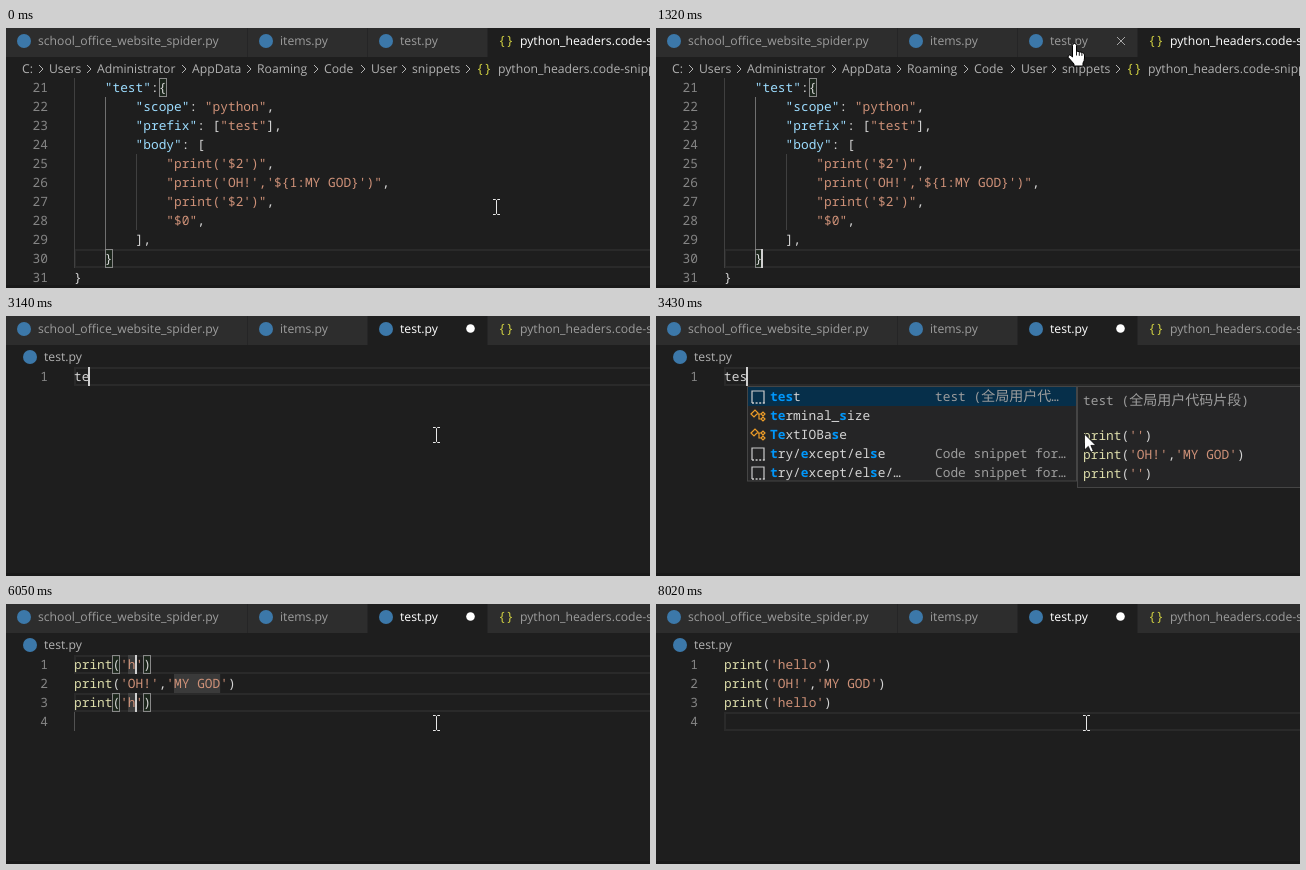
An HTML page that plays this animation: 644x260 px, repeating every 8.56 s.

```html
<!DOCTYPE html>
<html lang="en">
<head>
<meta charset="utf-8">
<title>Snippet demo</title>
<style>
  html, body { margin: 0; width: 100%; height: 100%; overflow: hidden; background: #1e1e1e; }
  svg { display: block; width: 644px; height: 260px; text-rendering: geometricPrecision; }
  text { white-space: pre; font-variant-ligatures: none; }
  .code { font: 500 12.83px "Noto Sans Mono", "Noto Sans CJK SC", monospace; }
  .ui { font: 12.2px "Open Sans", sans-serif; }
  .cjk { font: 14px "Noto Sans CJK SC", "Noto Sans CJK", sans-serif; }
</style>
</head>
<body>
<svg id="stage" viewBox="0 0 644 260"></svg>
<script>
const LOOP = 8560, LEFT = 68, TOP = 51, CW = 7.697, LH = 19;
const PLAIN = '#d4d4d4', KEY = '#9cdcfe', STR = '#ce9178', FUNC = '#dcdcaa';
const GREY = '#9d9d9d', CRUMB = '#b2b2b2', BLUE = '#3c78a9', YELLOW = '#cbcb41';
const stage = document.getElementById('stage');

const SNIPPET = [
  '    "test":{',
  '        "scope": "python",',
  '        "prefix": ["test"],',
  '        "body": [',
  '            "print(\'$2\')",',
  '            "print(\'OH!\',\'${1:MY GOD}\')",',
  '            "print(\'$2\')",',
  '            "$0",',
  '        ],',
  '    }',
  '}'
];

// Mouse path: time, x, y
const PATH = [
  [0, 490, 179], [80, 489, 176], [450, 478, 132], [890, 462, 82], [960, 441, 61],
  [1020, 421, 44], [1110, 421, 44], [1180, 421, 36], [1320, 420, 15], [1480, 420, 15],
  [1550, 420, 12], [1640, 420, 12], [1710, 420, 11], [1930, 420, 11], [2000, 428, 22],
  [2100, 440, 58], [2200, 436, 98], [2300, 430, 119], [LOOP, 430, 119]
];

const CARET_OFF = [
  [0, 80], [520, 1020], [1550, 2300], [2840, 2980], [3910, 4190],
  [4730, 5190], [7340, 7560], [8020, LOOP]
];

const within = (t, a, b) => t >= a && t < b;
const colX = c => Math.round(LEFT + c * CW);
const rowY = r => TOP + r * LH;
const rect = (x, y, w, h, fill, more = '') =>
  `<rect x="${x}" y="${y}" width="${w}" height="${h}" fill="${fill}" ${more}/>`;
const line = (d, color, width = 1) =>
  `<path d="${d}" fill="none" stroke="${color}" stroke-width="${width}"/>`;
const text = (x, y, s, fill, cls = 'ui') =>
  `<text class="${cls}" x="${x}" y="${y}" fill="${fill}">${s}</text>`;
const dot = (x, y, r, fill) => `<circle cx="${x}" cy="${y}" r="${r}" fill="${fill}"/>`;
const move = (x, y, body) => `<g transform="translate(${x} ${y})">${body}</g>`;

// Syntax-coloured line of code
function code(x, y, s) {
  const rule = /("[^"]*"(?=:))|("[^"]*"|'[^']*')|(print)|(?:(?!print)[^"'])+|./g;
  let out = '';
  for (const m of s.matchAll(rule)) {
    const fill = m[1] ? KEY : m[2] ? STR : m[3] ? FUNC : PLAIN;
    out += `<tspan x="${x + m.index * CW}" fill="${fill}">${m[0]}</tspan>`;
  }
  return text(x, y, out, PLAIN, 'code');
}

const lines = (list, first) => list.map((s, i) => {
  const n = String(first + i);
  return text(42 - n.length * CW, rowY(i) + 14, n, '#858585', 'code') + code(LEFT, rowY(i) + 14, s);
}).join('');

const bracket = (col, row) =>
  rect(colX(col) + .5, rowY(row) + .5, 7, 18, 'rgba(0,100,0,.1)', 'stroke="#888"');
const currentLine = row =>
  rect(LEFT + 1, rowY(row) + 1, 600, 17, 'none', 'stroke="#2a2a2a" stroke-width="2"');
const guide = (col, r1, r2, color) => rect(colX(col), rowY(r1), 1, (r2 - r1) * LH, color);
const mark = (col, row, n, color) => rect(colX(col), rowY(row), n * CW, LH, color);

function caret(t, col, row) {
  if (CARET_OFF.some(([a, b]) => within(t, a, b))) return '';
  return rect(col ? colX(col) - 1 : LEFT, rowY(row), 2, LH, '#d0d0d0');
}

function squiggle(x, y, w) {
  let d = `M${x} ${y + 2}`;
  for (let i = 0; i < w / 3; i++) d += `l3 ${i % 2 ? 2 : -2}`;
  return line(d, '#cca700');
}

const braces = (x, y) => text(x, y, '{}', YELLOW, 'code');

function tabs(t) {
  const active = t < 1850 ? 3 : 2;
  const names = ['school_office_website_spider.py', 'items.py', 'test.py', 'python_headers.code-snippets'];
  const edges = [0, 242, 362, 482, 720];
  let out = rect(0, 0, 644, 29, '#252526');
  names.forEach((name, i) => {
    const x = edges[i], on = i === active;
    out += rect(x, 0, edges[i + 1] - x - 1, 29, on ? '#1e1e1e' : '#2d2d2d');
    out += i < 3 ? dot(x + 18, 13, 7, BLUE) : braces(x + 10.3, 17);
    out += text(x + 32, 17, name, on ? '#fff' : '#9c9c9c');
  });
  if (t >= 2980) out += dot(464.5, 12.5, 4.3, '#fff');
  else if (t >= 1250) out += line('M461 9l8 8m0-8l-8 8', '#a8a8a8');
  return out;
}

function crumbs(t) {
  if (t >= 1850) return dot(24, 41, 7, BLUE) + text(38, 45, 'test.py', CRUMB);
  const parts = [[16, 'C:'], [43, 'Users'], [91, 'Administrator'], [186, 'AppData'],
    [251, 'Roaming'], [318, 'Code'], [365, 'User'], [406, 'snippets'], [492, 'python_headers.code-snippets']];
  return parts.map(([x, s], i) => {
    const lit = s === 'snippets' && within(t, 1020, 1180);
    const chevX = i === 8 ? 460 : x - 10;
    return (i ? line(`M${chevX} 37l4 4-4 4`, CRUMB) : '') + text(x, 45, s, lit ? '#e0e0e0' : CRUMB);
  }).join('') + braces(470.3, 45);
}

// This file is scrolled by one pixel
function snippetFile(t) {
  return move(0, -1, currentLine(9) + guide(0, 0, 10, '#404040') + guide(4, 1, 9, '#707070') +
    guide(8, 4, 8, '#404040') + bracket(11, 0) + bracket(4, 9) +
    lines(SNIPPET, 21) + caret(t, 5, 9));
}

// Colours the typed letters in order of appearance
function matched(label, typed) {
  let k = 0;
  return [...label].map(ch => ch.toLowerCase() === typed[k]
    ? (k++, `<tspan fill="#0097fb" font-weight="600">${ch}</tspan>`) : ch).join('');
}

const snippetIcon = (x, y) =>
  line(`M${x} ${y + 6}v-12h12v12`, '#ccc', 1.2) +
  `<path d="M${x} ${y + 6}h13" stroke="#ccc" stroke-width="1.4" stroke-dasharray="2 1.6"/>`;
const classIcon = (x, y) =>
  line(`M${x} ${y - 2}l4-4 3 3-4 4zm6 0h4m-2 0v5h2m0-5l2-2 2 2-2 2zm0 5l2-2 2 2-2 2z`, '#ee9d28', 1.2);
const cjk = (head, body, tail) => `${head}<tspan class="cjk">${body}</tspan>${tail}`;

function popup(x, typed) {
  const short = cjk('test (', '全局用户代', '…');
  const items = [['test', short], ['terminal_size'], ['TextIOBase'], ['TextIOWrapper'],
    ['try/except/else', 'Code snippet for…'], ['try/except/else/…', 'Code snippet for…']]
    .filter(([s]) => typed === 'te' || s !== 'TextIOWrapper');
  const px = x + 330;
  let out = rect(x + .5, 70.5, 329, items.length * LH - .5, '#252526', 'stroke="#454545"') +
    rect(x + 1, 71, 328, LH, '#062f4a');
  items.forEach(([label, info], i) => {
    const y = 80 + i * LH;
    out += info ? snippetIcon(x + 5, y + 1) : classIcon(x + 4, y + 1);
    out += text(x + 23, y + 5, matched(label, typed), PLAIN, 'code');
    if (info) out += text(x + 188, y + 5, info, GREY, 'code');
  });
  out += rect(px + .5, 70.5, 330, 101, '#252526', 'stroke="#454545"');
  out += text(px + 6, 89, cjk('test (', '全局用户代码片段', ')'), GREY, 'code');
  ["print('')", "print('OH!','MY GOD')", "print('')"].forEach((s, i) => {
    out += code(px + 6, 124 + i * LH, s);
  });
  return out;
}

function typing(t) {
  const s = t < 2980 ? '' : t < 3140 ? 't' : t < 3430 ? 'te' : 'tes';
  return currentLine(0) + lines([s], 1) + (t >= 4050 ? squiggle(LEFT, 67, 23) : '') +
    caret(t, s.length, 0) + (t >= 3200 ? popup(t < 3430 ? 83 : 91, s) : '');
}

function filled(t) {
  const n = [6050, 6110, 6500, 6650, 6880].filter(at => t >= at).length;
  const word = 'hello'.slice(0, n), call = `print('${word}')`;
  const done = t >= 7560, second = t >= 5590;
  const hint = 'rgba(124,124,124,.3)';
  let under = '', over = '';
  if (done) {
    under = currentLine(3);
    over = caret(t, 0, 3);
  } else {
    if (second) under += currentLine(0) + currentLine(2);
    else under += mark(13, 1, 6, '#264f78');
    if (t >= 4270) {
      under += mark(13, 1, 6, hint) + rect(LEFT, rowY(3), 1, LH, '#525252');
      for (const r of [0, 2])
        under += n ? mark(7, r, n, hint) : rect(colX(7), rowY(r), 1, LH, '#5a5a5a');
    }
    if (t < 4820) over += squiggle(LEFT, 67, 23);
    if (second) {
      for (const r of [0, 2]) {
        if (t >= 5660) under += bracket(5, r) + bracket(8 + n, r);
        over += caret(t, 7 + n, r);
      }
    } else {
      over += dot(187.3, 80, .9, 'rgba(227,228,226,.45)') + caret(t, 19, 1);
    }
  }
  return under + lines([call, "print('OH!','MY GOD')", call, ''], 1) + over;
}

const HAND = 'M5 14V2.5a2 2 0 0 1 4 0V8l6.2 1.6q1.8.6 1.8 2.5V15q0 3-1.5 5v3h-9v-2L.8 14.5q-.8-2 1-2.5 1.6 0 3.2 2z';
const ARROW = 'M0 0v16l3.8-3.6 2.5 5.8 2.6-1.1-2.5-5.7h5z';

function mouse(t) {
  const i = PATH.findIndex(p => p[0] > t);
  const [t0, x0, y0] = PATH[i - 1], [t1, x1, y1] = PATH[i];
  const f = (t - t0) / (t1 - t0);
  const x = Math.round(x0 + (x1 - x0) * f), y = Math.round(y0 + (y1 - y0) * f);
  if (within(t, 3200, 4190))
    return move(x - 1.5, y - 1, `<path d="${ARROW}" fill="#fff" stroke="#000" stroke-width=".8"/>`);
  if (y < 51)
    return move(x - 8.5, y, `<path d="${HAND}" fill="#fff" stroke="#000"/>` +
      line('M9 8v4.5m2.8-3.7v4m2.6-3.3v3.4', '#000', .9));
  return move(x, y, line('M-3 -7.5h2.5l1 1 1-1H4M-3 7.5h2.5l1-1 1 1H4M.5 -6.5v13', '#e8e8e8'));
}

function scene(t) {
  const body = t < 1850 ? snippetFile(t) : t < 4190 ? typing(t) : filled(t);
  return rect(0, 0, 644, 260, '#1e1e1e') + tabs(t) + crumbs(t) + body +
    rect(0, 257, 644, 3, '#191919') + mouse(t);
}

const start = performance.now();
let shown = '';
function tick() {
  const next = scene((performance.now() - start) % LOOP);
  if (next !== shown) stage.innerHTML = shown = next;
  requestAnimationFrame(tick);
}
tick();
</script>
</body>
</html>
```
